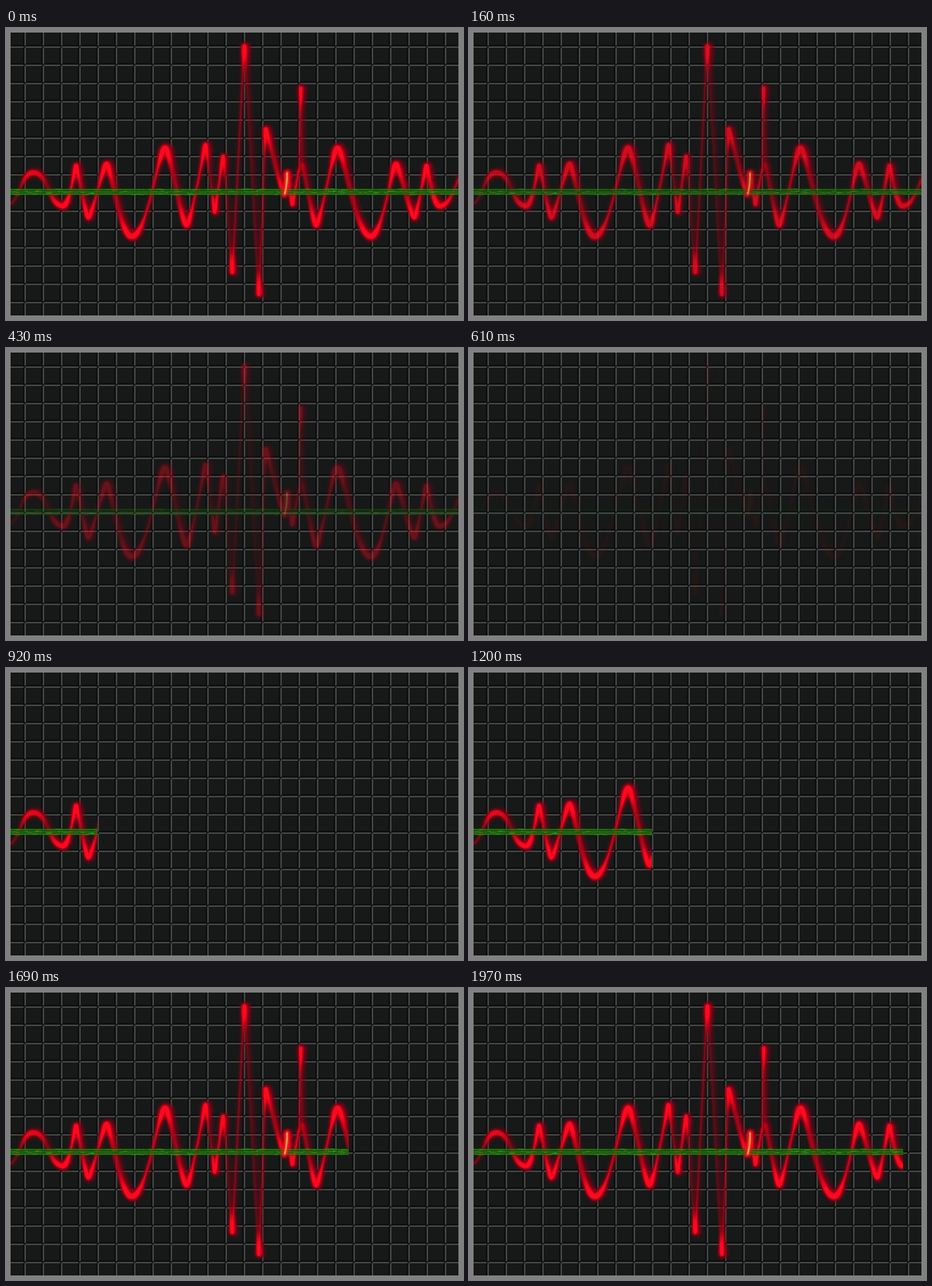
Write an HTML page with a canvas that moves like this. It is 600 px wide and 384 px high and loops after 2040 ms.

```html
<!DOCTYPE html>
<html lang="en">
<head>
<meta charset="utf-8">
<title>Pulse trace</title>
<style>
html, body { margin: 0; width: 100%; height: 100%; overflow: hidden; background: #808080; }
canvas { display: block; }
</style>
</head>
<body>
<canvas id="stage" width="600" height="384"></canvas>
<script>
const W = 600, H = 384, EDGE = 6, CELL = 24, BASE = 215;
const LOOP = 2040, HOLD = 70, FADE_STEP = 30, SWEEP_START = 640, SWEEP_STEP = 70;

// The outer waves are mirrored; only the burst between them is irregular
const WAVES = [[2, 232], [36, 190], [75, 234], [92, 181], [108, 249], [132, 179], [165, 274], [209, 158], [237, 259]];
const BURST = [
  [262, 154], [274, 242], [285, 169], [297, 321], [313, 24], [332, 350], [341, 133],
  [365, 219], [369, 190], [376, 232], [385, 185], [387, 79], [389, 180]
];
const POINTS = [...WAVES, ...BURST, ...WAVES.map(([x, y]) => [644 - x, y]).reverse()];

const clamp = (v, lo, hi) => Math.min(hi, Math.max(lo, v));
const bezier = (a, b, c, d, t) => {
  const u = 1 - t;
  return u * u * u * a + 3 * u * u * t * b + 3 * u * t * t * c + t * t * t * d;
};

function layer(draw) {
  const c = document.createElement('canvas');
  c.width = W;
  c.height = H;
  draw(c.getContext('2d'));
  return c;
}

function seeded(seed) {
  return () => (seed = (seed * 16807) % 2147483647) / 2147483647;
}

// Flat, wide turns are round, steep ones pointed; troughs are rounder than peaks
const nodes = POINTS.map(([x, y], i) => {
  const [px, py] = POINTS[i - 1] || [x, y], [nx, ny] = POINTS[i + 1] || [x, y];
  const gap = (nx - px) / 2;
  const height = (Math.abs(y - py) + Math.abs(y - ny)) / 2;
  const low = y > BASE;
  return {
    x, y,
    turn: (y - py) * (y - ny) > 0,
    round: clamp(gap * gap / height / (low ? 30 : 60), 0.05, 0.5),
    width: clamp(5.5 + gap * 0.15, 7, 11)
  };
});

// Falling strokes are broad and dim, rising ones narrow and bright, steep ones hairlines
function sampleTrace() {
  const out = [];
  for (let i = 0; i < nodes.length - 1; i++) {
    const a = nodes[i], b = nodes[i + 1];
    const dx = b.x - a.x, dy = b.y - a.y, falling = dy > 0;
    const mid = clamp(26 * dx / Math.abs(dy), 2.5, falling ? 7.5 : 3.6);
    const midLight = falling && mid > 3 ? 0.5 : (mid / 4) ** 1.5;
    const steps = Math.ceil(Math.hypot(dx, dy) / 2);
    for (let s = 0; s < steps; s++) {
      const t = s / steps;
      const x = bezier(a.x, a.x + dx * a.round, b.x - dx * b.round, b.x, t);
      const y = bezier(a.y, a.y, b.y, b.y, t);
      const near = n => n.turn ? Math.exp(-((x - n.x) ** 2 + (y - n.y) ** 2) / 400) : 0;
      const na = near(a), nb = near(b), tip = Math.max(na, nb);
      const w = mid + (na > nb ? (a.width - mid) * na : (b.width - mid) * nb);
      const ends = clamp(Math.min((x - 40) / 40, (604 - x) / 40), 0.3, 1);
      out.push({ x, y, w, tip, falling, light: ends * (tip + (1 - tip) * midLight) });
    }
  }
  return out;
}

// One pass of the brush on its own layer, softened as a whole
function brush(points, blur, color, width, alpha, shift = () => 0) {
  const raw = layer(g => {
    g.lineCap = 'round';
    g.strokeStyle = color;
    for (let i = 1; i < points.length; i++) {
      const p = points[i - 1], q = points[i];
      g.globalAlpha = clamp(alpha(q), 0, 1);
      g.lineWidth = width(q);
      g.beginPath();
      g.moveTo(p.x + shift(p), p.y);
      g.lineTo(q.x + shift(q), q.y);
      g.stroke();
    }
  });
  return layer(g => {
    g.filter = `blur(${blur}px)`;
    g.drawImage(raw, 0, 0);
  });
}

const grid = layer(g => {
  const bar = (color, x, y, w, h) => { g.fillStyle = color; g.fillRect(x, y, w, h); };
  bar('#161918', 0, 0, W, H);
  for (let x = 0; x < W; x += CELL) {
    for (let y = 0; y < H; y += CELL) {
      bar('#0d0f0e', x + 22, y + 2, 2, 22);
      bar('#0d0f0e', x + 2, y + 22, 22, 2);
      bar('#353837', x, y + 2, 1, 21);
      bar('#4d504e', x + 1, y + 2, 1, 21);
      bar('#353837', x + 2, y, 21, 1);
      bar('#4d504e', x + 2, y + 1, 21, 1);
      bar('#202322', x, y, 2, 2);
    }
  }
});

function drawBaseline(g) {
  const rand = seeded(71);
  for (let d = -4; d <= 4; d++) {
    g.globalAlpha = Math.abs(d) === 4 ? 0.55 : 0.82;
    g.fillStyle = `hsl(108, 82%, ${24 + 8 * Math.cos(d * 2.1)}%)`;
    g.fillRect(0, BASE + d, W, 1);
  }
  g.globalAlpha = 0.3;
  for (let i = 0; i < 260; i++) {
    g.fillStyle = rand() < 0.5 ? '#0c4006' : '#46c020';
    g.fillRect(rand() * W, BASE - 4 + Math.floor(rand() * 9), 2 + rand() * 7, 1);
  }
  g.globalAlpha = 1;
}

function drawGlint(g) {
  g.lineCap = 'round';
  for (const [color, width, blur] of [['#e8101e', 7, 2], ['#ff3020', 4, 1], ['#ffb050', 1.8, 0.6]]) {
    g.filter = `blur(${blur}px)`;
    g.strokeStyle = color;
    g.lineWidth = width;
    g.beginPath();
    g.moveTo(369, 191);
    g.quadraticCurveTo(369, 208, 366, 218);
    g.stroke();
  }
}

const signal = layer(g => {
  const pts = sampleTrace();
  const passes = [
    brush(pts, 2, '#80001a', p => p.w + 3, p => 0.45 * p.light, p => p.falling ? 2.5 : 0.5),
    brush(pts, 1, '#d00018', p => p.w * 0.85, p => 0.6 * p.light),
    brush(pts, 0.6, '#ff0a20', p => p.w * 0.55, p => p.light * (p.falling ? p.tip : 0.35 + 0.65 * p.tip))
  ];
  passes.forEach(p => g.drawImage(p, 0, 0));
  drawBaseline(g);
  drawGlint(g);
});

const ctx = document.getElementById('stage').getContext('2d');

function stateAt(t) {
  if (t < HOLD) return { alpha: 1, reach: W };
  if (t < SWEEP_START) return { alpha: 1 - (1 + Math.floor((t - HOLD) / FADE_STEP)) / 20, reach: W };
  return { alpha: 1, reach: 30 * Math.floor((t - SWEEP_START) / SWEEP_STEP) };
}

function render(t) {
  const { alpha, reach } = stateAt(t);
  ctx.fillStyle = '#808080';
  ctx.fillRect(0, 0, W, H);
  ctx.save();
  ctx.beginPath();
  ctx.rect(EDGE, EDGE, W - 2 * EDGE, H - 2 * EDGE);
  ctx.clip();
  ctx.drawImage(grid, 0, 0);
  if (reach > 0) {
    ctx.globalAlpha = alpha;
    ctx.drawImage(signal, 0, 0, reach, H, 0, 0, reach, H);
  }
  ctx.restore();
}

const start = performance.now();
function tick() {
  render((performance.now() - start) % LOOP);
  requestAnimationFrame(tick);
}
tick();
</script>
</body>
</html>
```
